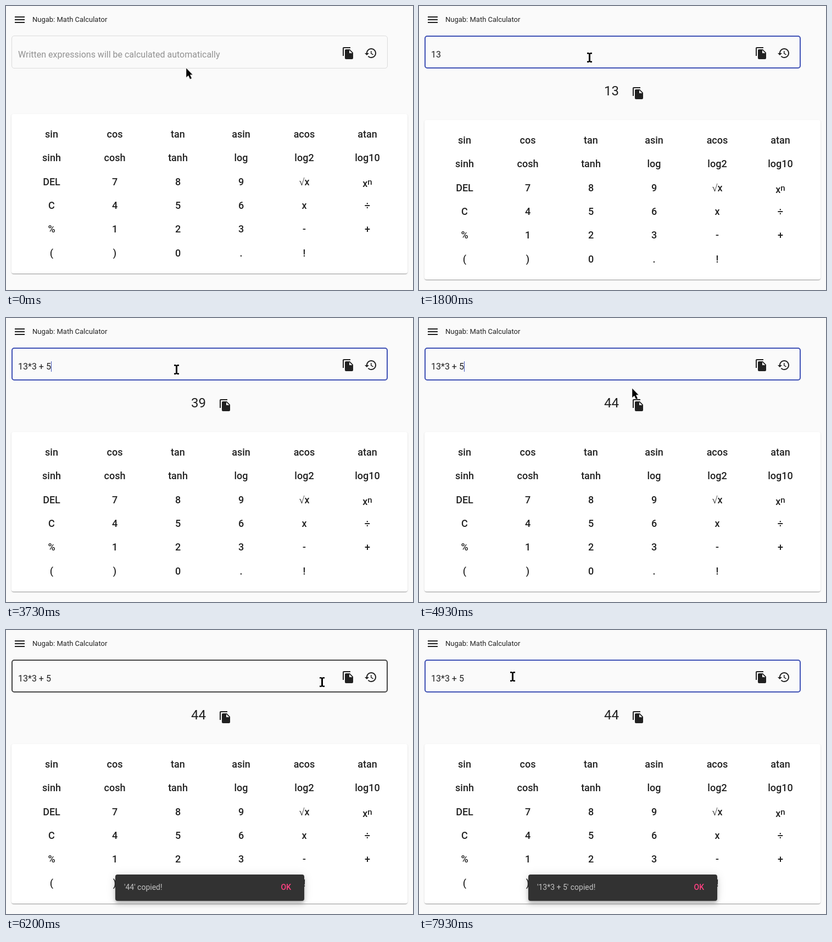
Recreate the animation shown at these times as an HTML page. Size 741 px wide and 518 px high, loop 8 s.

```html
<!DOCTYPE html>
<html lang="en">
<head>
<meta charset="utf-8">
<title>Math Calculator</title>
<style>
html, body { margin: 0; width: 100%; height: 100%; overflow: hidden; background: #fafafa; }
body { position: relative; font-family: Roboto, sans-serif; color: rgba(0,0,0,.87); }
div, svg { position: absolute; box-sizing: border-box; white-space: pre; }
svg { overflow: visible; fill: #212121; }
#title { left: 48px; top: 17px; font-size: 13px; line-height: 15px; }
.outline { left: 10px; top: 54px; width: 685px; height: 60px; border-radius: 5px; border: 1px solid rgba(0,0,0,.12); }
#thick { border: 2px solid #212121; }
#input, #hint { left: 22px; top: 79px; font-size: 16px; line-height: 19px; }
#hint { color: rgba(0,0,0,.42); }
#caret { display: inline-block; width: 1px; height: 19px; vertical-align: top; background: #3f51b5; }
#value { left: 337px; top: 141px; font-size: 24px; line-height: 28px; }
.disc { border-radius: 50%; background: #000; opacity: 0; }
#pulse { left: 320px; top: 137px; width: 34px; height: 34px; }
.press { width: 40px; height: 40px; }
#card {
  left: 10px; top: 197px; width: 721px; height: 291px; border-radius: 4px; background: #fff;
  box-shadow: 0 2px 1px -1px rgba(0,0,0,.2), 0 1px 1px rgba(0,0,0,.14), 0 1px 3px rgba(0,0,0,.12);
}
.key { width: 115px; height: 43px; border-radius: 4px; text-align: center; font-size: 18px; font-weight: 500; line-height: 43px; }
.key.on { background: rgba(0,0,0,.08); }
.key i { font: 18px "Liberation Serif", serif; line-height: 1; }
.key b { position: relative; top: 3px; font-weight: 500; }
.key sup { position: relative; top: -4px; font-size: 15px; vertical-align: baseline; line-height: 0; }
#snack {
  left: 199px; top: 446px; width: 344px; height: 48px; border-radius: 4px; background: #323232;
  font-size: 14px; line-height: 16px; color: rgba(255,255,255,.7);
  box-shadow: 0 3px 5px -1px rgba(0,0,0,.2), 0 6px 10px rgba(0,0,0,.14), 0 1px 18px rgba(0,0,0,.12);
}
#message { left: 16px; top: 15px; }
#ok { right: 24px; top: 15px; font-weight: 500; color: #ff4081; }
#pointer { left: 0; top: 0; width: 1px; height: 1px; fill: #000; }
</style>
</head>
<body>
<div id="title">Nugab: Math Calculator</div>
<div class="outline"></div>
<div class="outline" id="thick"></div>
<div id="hint">Written expressions will be calculated automatically</div>
<div id="input"><span id="typed"></span><span id="caret"></span></div>
<div class="disc press" id="fieldPress" style="left:603px;top:66px"></div>
<div id="result">
  <div class="disc" id="pulse"></div>
  <div class="disc press" id="resultPress" style="left:379px;top:139px"></div>
  <div id="value"></div>
</div>
<div id="card"></div>
<div id="snack"><div id="message"></div><div id="ok">OK</div></div>
<svg id="pointer">
  <path id="arrow" d="M0 0V17.5L4 14L7 20.5L10.3 19L7.3 12.6H12Z" stroke="#fff" stroke-width=".5"/>
  <path id="beam" d="M-4-9H-1L.5-8L2-9H5V-6.5H2V6.5H5V9H2L.5 8L-1 9H-4V6.5H-1V-6.5H-4Z"/>
  <g id="hand">
    <path d="M-2 1.5Q0-1.2 2 1.5V7L5 7.5L8 8.5L11 10.5Q12 13 10.5 17L9.5 23H0L-1.5 20L-6.5 14Q-8 10.5-5 10.5L-2 13Z"/>
    <path d="M2.5 8v4M5.5 8.5v3.5M8.5 9.5v3" fill="none" stroke="#fff" stroke-width=".8"/>
  </g>
</svg>
<script>
const $ = id => document.getElementById(id);
const LOOP = 8000;

const icons = {
  menu: 'M3 18h18v-2H3v2zm0-5h18v-2H3v2zm0-7v2h18V6H3z',
  copy: 'M16 1H4c-1.1 0-2 .9-2 2v14h2V3h12V1zm-1 4l6 6v10c0 1.1-.9 2-2 2H7.99C6.89 23 6 22.1 6 21l.01-14c0-1.1.89-2 1.99-2h7zm-1 7h5.5L14 6.5V12z',
  history: 'M13 3c-4.97 0-9 4.03-9 9H1l3.89 3.89.07.14L9 12H6c0-3.87 3.13-7 7-7s7 3.13 7 7-3.13 7-7 7c-1.93 0-3.68-.79-4.94-2.06l-1.42 1.42C8.27 19.99 10.51 21 13 21c4.97 0 9-4.03 9-9s-4.03-9-9-9zm-1 5v5l4.28 2.54.72-1.21-3.5-2.08V8H12z'
};
function addIcon(parent, name, x, y) {
  parent.insertAdjacentHTML('beforeend',
    `<svg width="24" height="24" style="left:${x}px;top:${y}px"><path d="${icons[name]}"/></svg>`);
}
addIcon($('title'), 'menu', -35, -4);
addIcon($('hint').parentNode, 'copy', 611, 74);
addIcon($('hint').parentNode, 'history', 652, 74);
addIcon($('result'), 'copy', 387, 147);
document.body.append($('snack'), $('pointer'));

const labels = ('sin cos tan asin acos atan sinh cosh tanh log log2 log10 DEL 7 8 9 <i>√</i>x ' +
  '<b>x<sup>n</sup></b> C 4 5 6 x ÷ % 1 2 3 - + ( ) 0 . !').split(' ');
const keys = {};
labels.forEach((label, i) => {
  const key = document.createElement('div');
  key.className = 'key';
  key.innerHTML = label;
  key.style.left = 15.5 + 115 * (i % 6) + 'px';
  key.style.top = Math.round(15 + 43.35 * Math.floor(i / 6)) + 'px';
  $('card').append(key);
  keys[label] = key;
});

// Each track lists [start time, value]; the value holds until the next entry.
const typing = [[0, ''], [500, ''], [870, '1'], [1130, '13'], [2200, '13*'], [2600, '13*3'],
  [3200, '13*3 '], [3330, '13*3 +'], [3400, '13*3 + '], [3600, '13*3 + 5']];
const pressed = [[0, ''], [870, '1'], [1070, ''], [1130, '3'], [1330, ''], [2600, '3'],
  [2730, ''], [3330, '+'], [3600, '5'], [3730, '']];
const results = [[0, ''], [1530, '13'], [2530, ''], [2930, '39'], [3870, '44']];
const shapes = [[0, 'arrow'], [70, 'beam'], [4860, 'arrow'], [4990, 'hand'], [5850, 'arrow'],
  [5940, 'beam'], [6270, 'hand'], [7460, 'beam']];
const outlines = [[0, 'none'], [70, 'hover'], [500, 'focus'], [5470, 'none'], [5940, 'hover'], [7870, 'focus']];
const path = [[0, 328, 113], [70, 325, 110], [600, 310, 94], [4660, 310, 94], [4860, 356, 114],
  [4930, 388, 128], [5070, 417, 143], [5270, 401, 153], [5740, 401, 153], [5940, 450, 113],
  [6270, 608, 90], [6530, 623, 86], [7330, 623, 86], [7460, 580, 88], [7870, 170, 85], [LOOP, 170, 85]];

const clamp = v => Math.max(0, Math.min(1, v));
const easeOut = v => 1 - (1 - clamp(v)) ** 3;
const entry = (track, t) => track.findLast(e => e[0] <= t);

function pointerAt(t) {
  const i = path.findLastIndex(p => p[0] <= t);
  const [t0, x0, y0] = path[i], [t1, x1, y1] = path[i + 1];
  const k = (t - t0) / (t1 - t0);
  return [x0 + (x1 - x0) * k, y0 + (y1 - y0) * k];
}

// Rises over 150 ms, holds, then fades.
const pressAlpha = age => age < 0 ? 0 : .09 * Math.min(1, .45 + age / 270) * (1 - clamp((age - 260) / 300));

function render(t) {
  const [typedAt, text] = entry(typing, t);
  $('typed').textContent = text;
  $('hint').style.opacity = text ? 0 : 1;
  const caretOn = t >= 500 && t < 5470 && Math.floor((t - typedAt) / 500) % 2 === 0;
  $('caret').style.opacity = caretOn ? 1 : 0;

  const active = entry(pressed, t)[1];
  for (const label in keys) keys[label].classList.toggle('on', label === active);

  const [shownAt, value] = entry(results, t);
  $('value').textContent = value;
  $('result').style.display = value ? 'block' : 'none';
  $('card').style.top = (value ? 208 : 197) + 'px';
  $('pulse').style.opacity = .065 * (1 - clamp((t - shownAt) / 260));
  $('resultPress').style.opacity = pressAlpha(t - 5470);
  $('fieldPress').style.opacity = pressAlpha(t - 7070);

  const [since, outline] = entry(outlines, t);
  $('thick').style.borderColor = outline === 'focus' ? '#3f51b5' : '#212121';
  $('thick').style.opacity = outline === 'none' ? 0 : outline === 'focus' ? 1 : easeOut((t - since) / 600);

  const second = t >= 7280;
  const enter = easeOut((t - (second ? 7280 : 5575)) / 150);
  const leave = second ? 0 : clamp((t - 7200) / 75);
  $('message').textContent = second ? "'13*3 + 5' copied!" : "'44' copied!";
  $('snack').style.opacity = enter * (1 - leave);
  $('snack').style.transform = enter < 1 ? `scale(${.8 + .2 * enter})` : 'none';

  const shape = entry(shapes, t)[1];
  for (const id of ['arrow', 'beam', 'hand']) $(id).style.display = id === shape ? '' : 'none';
  const [x, y] = pointerAt(t);
  $('pointer').style.transform = `translate(${Math.round(x)}px, ${Math.round(y)}px)`;
}

const start = performance.now();
function tick() {
  render((performance.now() - start) % LOOP);
  requestAnimationFrame(tick);
}
tick();
</script>
</body>
</html>
```
